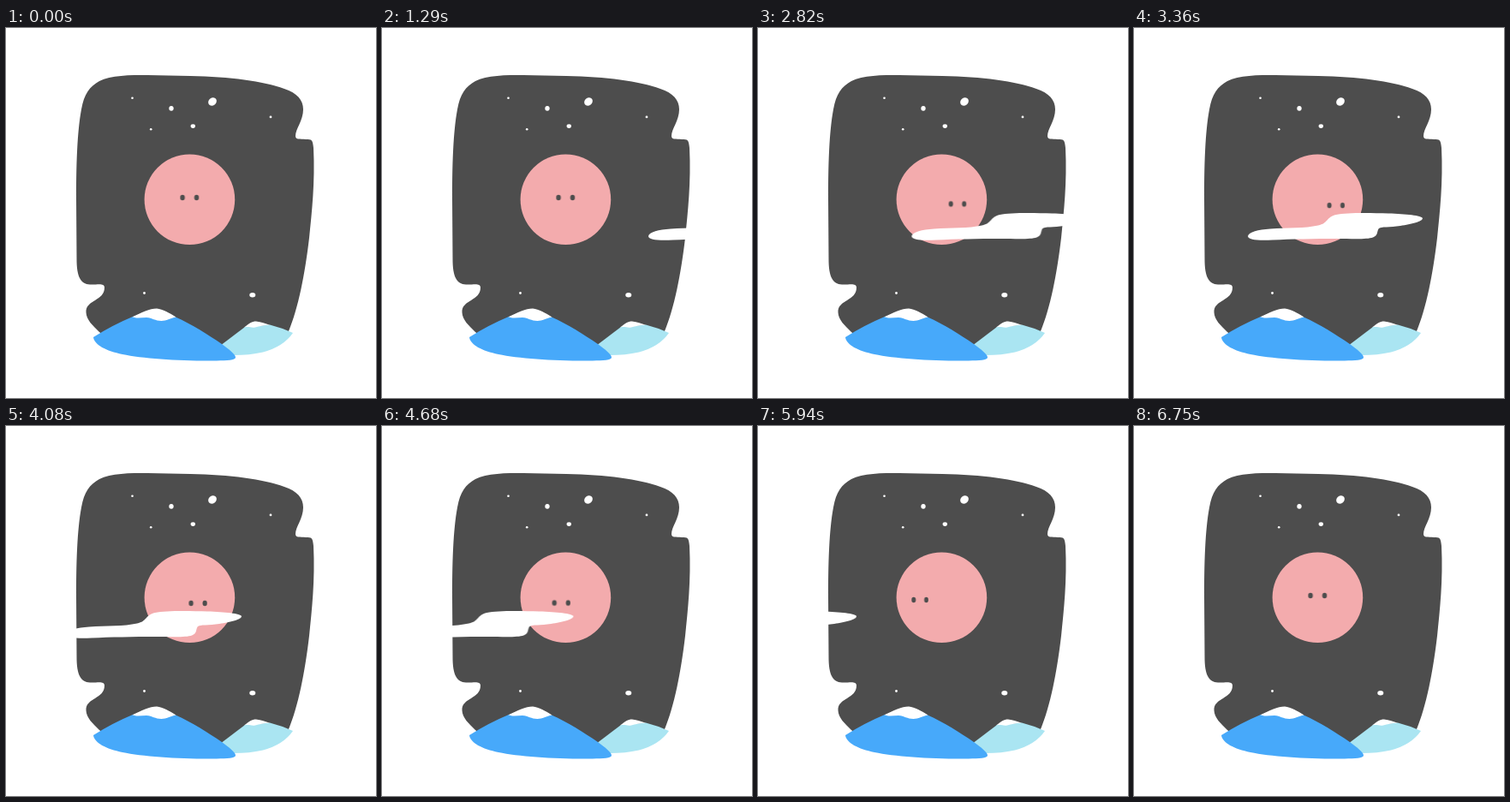
Animation, 432 px wide and 432 px high, one loop 7.2 s. Source, as an HTML page:

```html
<!DOCTYPE html>
<html lang="en">
<head>
<meta charset="utf-8">
<title>Sun and cloud</title>
<style>
  html, body { margin: 0; width: 100%; height: 100%; overflow: hidden; background: #fff; }
  svg { display: block; width: 100%; height: 100%; }
  .night { fill: #4d4d4d; }
  .white { fill: #fff; }

  .cloud { animation: drift 7.2s linear infinite; }
  .look-x { animation: look-x 7.2s infinite; }
  .look-y { animation: look-y 7.2s infinite; }
  .turn { animation: turn 7.2s infinite; }
  .look-x, .look-y, .turn { animation-timing-function: cubic-bezier(.37, 0, .63, 1); }

  @keyframes drift {
    from { transform: translateX(422px); }
    to { transform: translateX(-197.2px); }
  }
  @keyframes look-x {
    0%, 31.94% { transform: translateX(214.3px); }
    42.08% { transform: translateX(237.2px); }
    83.75% { transform: translateX(189px); }
    93.75%, 100% { transform: translateX(214.3px); }
  }
  @keyframes look-y {
    0%, 31.94% { transform: translateY(198px); }
    42.08% { transform: translateY(207.1px); animation-timing-function: cubic-bezier(.85, 0, .85, .6); }
    83.75% { transform: translateY(202.6px); }
    93.75%, 100% { transform: translateY(198px); }
  }
  /* the face narrows as it turns away from the front */
  @keyframes turn {
    0%, 31.94% { transform: scaleX(1); }
    42.08% { transform: scaleX(.93); }
    62.92% { transform: scaleX(.99); animation-timing-function: linear; }
    83.75% { transform: scaleX(.89); }
    93.75%, 100% { transform: scaleX(1); }
  }
</style>
</head>
<body>
<svg viewBox="0 0 432 432">
  <path class="night" d="M82 200C82 160 83 122 88 95C91 77 98 68 109 62C122 55 145 55 165 55L215 56
    C262 57 300 62 325 71C340 76 347 84 347 95C347 108 338 118 338 126C338 131 343 129 350 130
    C357 130 358 130 359 140C361 180 357 216 354 245C349 288 341 328 330 354L300 372L130 372L109 355
    C101 347 94 341 93.500 332C93 317 115 319 115 303C115 297 106 300 98 299.500C87 299 82.500 290 82.500 270Z"/>

  <g class="white">
    <circle cx="147.500" cy="81.700" r="1.300"/>
    <ellipse cx="193" cy="93.800" rx="2.700" ry="2.900"/>
    <ellipse cx="241" cy="86" rx="5.200" ry="4.300" transform="rotate(-38 241 86)"/>
    <circle cx="309" cy="103.900" r="1.400"/>
    <circle cx="169.200" cy="118.200" r="1.300"/>
    <ellipse cx="218.300" cy="114.600" rx="2.700" ry="2.400"/>
    <circle cx="161.500" cy="309.500" r="1.400"/>
    <ellipse cx="287.800" cy="311.700" rx="3.500" ry="2.700"/>
  </g>

  <path fill="#aae5f2" d="M250 371L279 349L308 346.500Q322 350 335 356Q324 372 300 378.500Q284 382 266 382Z"/>
  <path class="white" d="M278 349.500C284 345 287 342.500 292 342.500C298 343 303 345 308 346.700
    C301 347 296 348 291 349.500C286 350.500 284 348 278 349.500Z"/>

  <path fill="#47a9fa" d="M102 361Q124 347 148 337L198 337.500C217 346 236 358 252 369
    C260 375 268 381 268 384.500C268 388 258 388 246 388.500C205 389 160 386 136 381C117 377 103 370 102 361Z"/>
  <path class="white" d="M147.500 337.300C158 332.500 168 327.500 176 327.500C183 328 191 333 198.500 337.500
    C192 339 187 342 181.500 342C174 342 171 338.500 164 338C158 338 153 339.500 147.500 337.300Z"/>

  <circle cx="214.400" cy="200.300" r="52.800" fill="#f3abad"/>

  <g class="look-x"><g class="look-y"><g class="turn night">
    <ellipse cx="-8.200" rx="2.700" ry="3.200"/>
    <ellipse cx="8.200" rx="2.700" ry="3.200"/>
  </g></g></g>

  <path class="white cloud" d="M0 243C1 238 12 235.500 26 234.500C46 233 67 234 82 230.500
    C94 228 91 221 103 218C115 215.500 142 216 164 216.500C184 217 203 219 204 222
    C204 226 191 229 178 231C166 233 155 231.500 152.500 234.500C150.500 238 152 242 146 244.500
    C139 247 122 246 103 246C78 246 50 246.500 29 247.500C13 248.500 0 247.500 0 243Z"/>
</svg>
</body>
</html>
```
